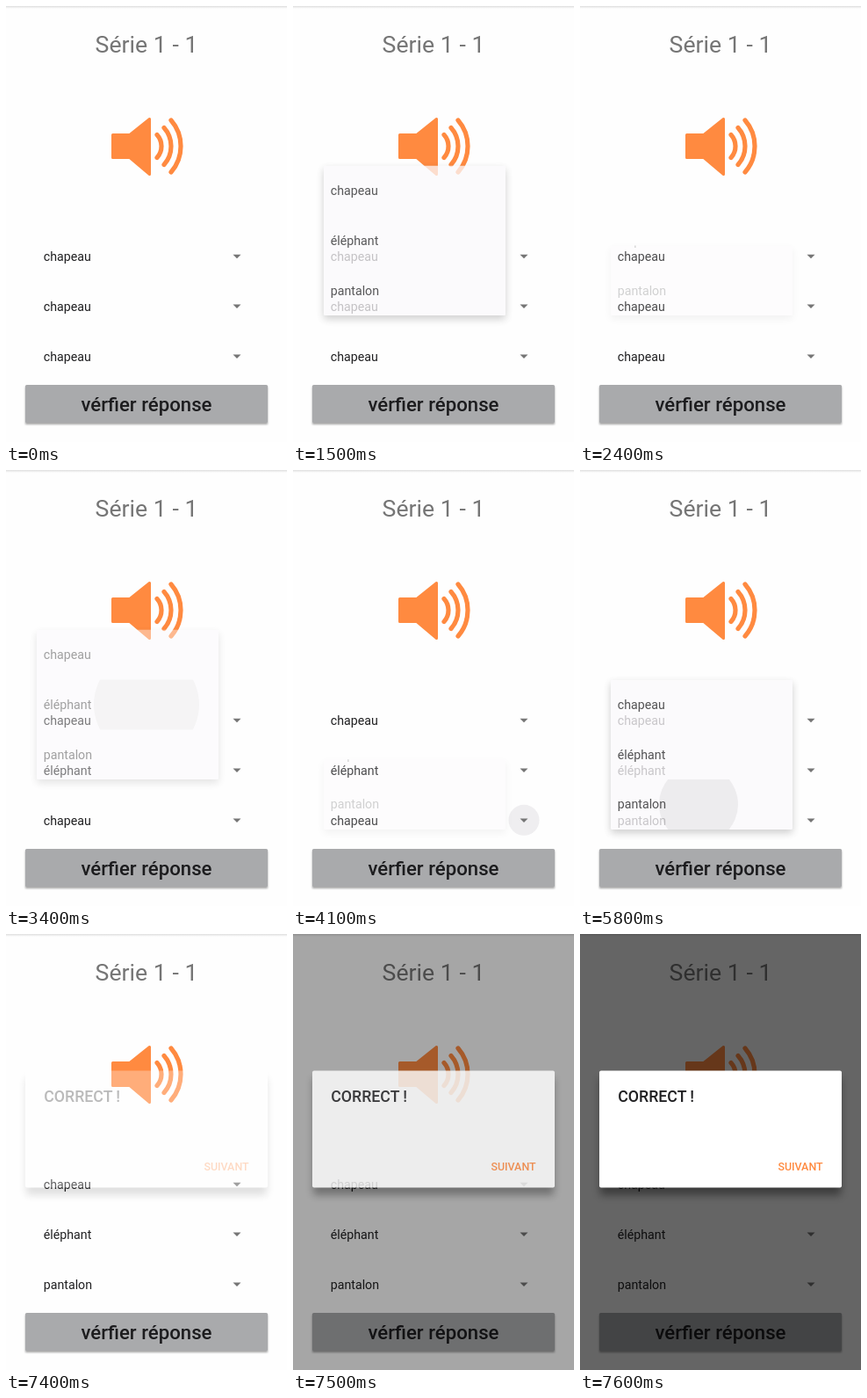
Animation of 320 by 496 pixels, one loop 8 s. Source, as an HTML page:

```html
<!DOCTYPE html>
<html lang="fr">
<head>
<meta charset="utf-8">
<title>Série 1 - 1</title>
<style>
  html, body { margin: 0; width: 100%; height: 100%; overflow: hidden; background: #fefefe; }
  svg { display: block; width: 320px; height: 496px; }
  text { font: 14.22px Roboto, sans-serif; fill: #202022; }
  .title { font-size: 26.67px; fill: #757575; text-anchor: middle; }
  .button { font-size: 22.2px; font-weight: 500; text-anchor: middle; fill: #1c1c1e; }
  .result { font-size: 17.78px; font-weight: 500; }
  .next { font-size: 12.44px; font-weight: 500; fill: #ff8a40; text-anchor: middle; }
</style>
</head>
<body>
<svg viewBox="0 0 320 496">
  <defs>
    <linearGradient id="edge" x2="0" y2="1">
      <stop stop-color="#dedede"/><stop offset="1" stop-color="#fefefe"/>
    </linearGradient>
    <filter id="soft" x="-20%" y="-30%" width="140%" height="160%"><feGaussianBlur stdDeviation="5"/></filter>
    <filter id="tight" x="-5%" y="-20%" width="110%" height="140%"><feGaussianBlur stdDeviation="1.3"/></filter>
    <clipPath id="reveal"><rect class="sheet" x="35" width="207"/></clipPath>
    <clipPath id="picked"><rect id="pickedRow" x="35" width="207" height="57"/></clipPath>
  </defs>

  <rect width="320" height="496" fill="#fefefe"/>
  <rect width="320" height="3" fill="url(#edge)"/>
  <text class="title" x="160" y="53">Série 1 - 1</text>

  <g fill="#ff8a40" stroke="#ff8a40" stroke-linejoin="round" stroke-linecap="round">
    <path stroke-width="3" d="M121.5 146.5H141L163.5 128.5V191.5L141 172.5H121.5Z"/>
    <path fill="none" stroke-width="5.2" d="M172 146.5A19.4 19.4 0 0 1 172 172.5M180 138.5A31.6 31.6 0 0 1 180 180.5M188 130A45 45 0 0 1 188 189"/>
  </g>

  <circle id="press" cx="263" cy="398.3" r="17.5" fill="#efeef0"/>
  <g id="spinners"></g>

  <rect x="22" y="433" width="276" height="43" fill="#000" opacity=".35" filter="url(#tight)"/>
  <rect x="22" y="431" width="276" height="43" rx="1.5" fill="#a9aaac"/>
  <text class="button" x="160" y="461">vérfier réponse</text>

  <g id="popup">
    <g transform="translate(0 4)">
      <rect class="sheet" x="35" width="207" opacity=".25" filter="url(#soft)"/>
    </g>
    <g clip-path="url(#reveal)">
      <rect class="sheet" x="35" width="207" rx="1.5" fill="#fbf9fc"/>
      <circle id="ripple" fill="#000" opacity=".07" clip-path="url(#picked)"/>
      <g id="options"></g>
    </g>
  </g>

  <rect id="dim" width="320" height="496"/>
  <g id="dialog">
    <rect x="23" y="164" width="274" height="133" opacity=".4" filter="url(#soft)"/>
    <rect x="22" y="155.5" width="276" height="133" rx="2" fill="#fff"/>
    <text class="result" x="43.2" y="191">CORRECT !</text>
    <text class="next" x="251" y="268.5">SUIVANT</text>
  </g>
</svg>
<script>
const LOOP = 8000, TICK = 100, ROW = 56.8, HEIGHT = 170.5;
const WORDS = ['chapeau', 'éléphant', 'pantalon'];
const OPENING = [.2, .55, .85, 1];

const POPUPS = [
  { row: 0, top: 181.6, open: 500, close: 1500, fade: [.75, .4, 0], x: 135, radii: [] },
  { row: 1, top: 181.6, open: 2400, close: 3200, fade: [1, .75, .42, 0], x: 160, radii: [25, 45, 60] },
  { row: 2, top: 238.4, open: 4100, close: 5800, fade: [.77, .4, 0], x: 135, radii: [45, 60] }
];
const DIALOG = { start: 7300, alpha: [.1, .3, .8, 1], dim: [0, 0, .35, .6] };

const $ = id => document.getElementById(id);
const sheets = document.querySelectorAll('.sheet');

function add(parent, tag, attrs, text = '') {
  const el = document.createElementNS('http://www.w3.org/2000/svg', tag);
  set(el, attrs);
  el.textContent = text;
  return parent.appendChild(el);
}
function set(el, attrs) {
  for (const key in attrs) el.setAttribute(key, attrs[key]);
}
function at(list, t, start) {
  const i = (t - start) / TICK;
  return i < 0 ? 0 : list[Math.min(i, list.length - 1)];
}

const values = WORDS.map((_, i) => {
  const y = 285 + i * ROW;
  add($('spinners'), 'path', { d: `M258.5 ${y - 2.2}h9l-4.5 4.5z`, fill: '#757575' });
  return add($('spinners'), 'text', { x: 42.7, y: y + 5 });
});
WORDS.forEach((word, i) => add($('options'), 'text', { x: 42.7, y: 33.5 + i * ROW }, word));

function drawPopup(p, t) {
  const closing = t >= p.close;
  const alpha = closing ? at(p.fade, t, p.close) : at(OPENING, t, p.open);
  // The sheet unfolds from the row that was tapped.
  const grow = closing ? 1 : alpha;
  const seed = Math.min(256.5 + p.row * ROW, p.top + HEIGHT - ROW);
  const y = seed + (p.top - seed) * grow;
  const height = ROW + (HEIGHT - ROW) * grow;
  sheets.forEach(el => set(el, { y, height }));
  set($('popup'), { opacity: alpha });
  set($('options'), { transform: `translate(0 ${p.top})` });

  const rowTop = p.top + p.row * ROW;
  set($('pickedRow'), { y: rowTop });
  set($('ripple'), { cx: p.x, cy: rowTop + ROW / 2, r: closing ? at(p.radii, t, p.close) || 0 : 0 });
}

function draw(time) {
  const t = Math.floor(time % LOOP / TICK) * TICK;
  const chosen = [0, t >= 3300 ? 1 : 0, t >= 5800 ? 2 : 0];
  values.forEach((el, i) => { el.textContent = WORDS[chosen[i]]; });

  const popup = POPUPS.find(p => t >= p.open && t < p.close + p.fade.length * TICK);
  set($('popup'), { visibility: popup ? 'visible' : 'hidden' });
  if (popup) drawPopup(popup, t);

  set($('press'), { opacity: t >= 4100 && t < 5800 ? 1 : 0 });
  set($('dialog'), { opacity: at(DIALOG.alpha, t, DIALOG.start) });
  set($('dim'), { opacity: at(DIALOG.dim, t, DIALOG.start) });
}

const begin = performance.now();
(function frame() {
  draw(performance.now() - begin);
  requestAnimationFrame(frame);
})();
</script>
</body>
</html>
```
